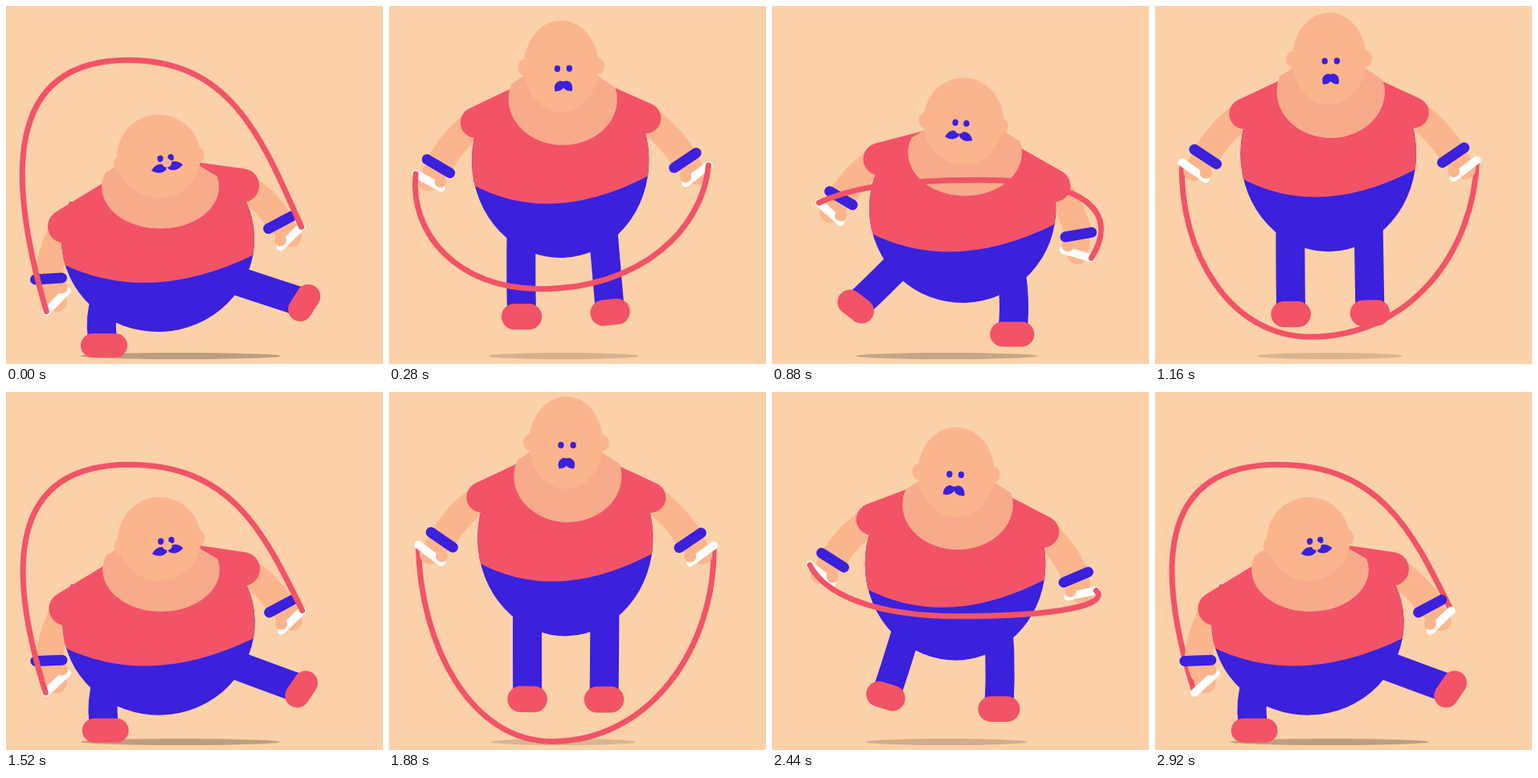
Write an HTML page with a canvas that moves like this. It is 469 by 445 pixels and loops after 2.96 s.

```html
<!DOCTYPE html>
<html lang="en">
<head>
<meta charset="utf-8">
<title>Rope jumper</title>
<style>
html, body { margin: 0; width: 100%; height: 100%; overflow: hidden; background: #fbd1a9; }
canvas { display: block; }
</style>
</head>
<body>
<canvas id="stage" width="469" height="445"></canvas>
<script>
const g = document.getElementById('stage').getContext('2d');
const BG = '#fbd1a9', SKIN = '#fbb58d', NECK = '#f8ab8a', RED = '#f25367', BLUE = '#3b20dc', WHITE = '#fff';
const JUMP = 740, STEP = 40, SIDES = [-1, 1];

// Limb joints measured outwards from the head: in the air, landing on this side, landing on the other side
const LIMB = {
  shoulder: [[105, 68], [117, 87], [104, 36]],
  wrist: [[154.5, 121], [137, 152], [151, 82]],
  hand: [[169.5, 138], [127, 180], [164.5, 100]],
  knee: [[48, 235], [80, 190], [104, 157]],
  foot: [[47, 320], [68, 235], [181, 182]],
  bandTurn: [[.6], [-.06], [.49]],
  gripTurn: [[.64], [-.79], [.77]],
  footTurn: [[0], [0], [1.01]],
  footHalf: [[8.5], [14], [9.5]]
};

const mix = (p, q, k) => p.map((v, i) => v + (q[i] - v) * k);

function ends([x, y], turn, half) {
  const dx = half * Math.cos(turn), dy = half * Math.sin(turn);
  return [[x + dx, y - dy], [x - dx, y + dy]];
}

// Sway goes from -1 (left landing) to 1 (right landing); ground is 1 on landing and 0 in the air
function poseAt(t) {
  const k = -Math.cos(Math.PI * t / JUMP);
  const ground = Math.abs(k) ** 2.3, s = 1 - ground;
  const sway = .35 * k + .65 * k ** 3;
  const head = [219 + 29 * sway, 187 - 125 * s];
  const limbs = SIDES.map(side => {
    const limb = { side };
    for (const part in LIMB) {
      const [air, near, far] = LIMB[part];
      limb[part] = mix(air, side * k > 0 ? near : far, ground);
    }
    limb.grip = ends(limb.hand, limb.gripTurn[0], 18);
    return limb;
  });
  return { sway, ground, s, head, limbs, tilt: .12 * sway };
}

const toStage = (pose, side, [x, y]) => [pose.head[0] + side * x, pose.head[1] + y];

function oval(x, y, rx, ry, color) {
  g.fillStyle = color;
  g.beginPath();
  g.ellipse(x, y, rx, ry, 0, 0, 7);
  g.fill();
}

function stroke(width, color, cap = 'round') {
  g.lineWidth = width;
  g.strokeStyle = color;
  g.lineCap = cap;
  g.lineJoin = 'round';
  g.stroke();
}

function bar(p, q, width, color) {
  g.beginPath();
  g.moveTo(...p);
  g.lineTo(...q);
  stroke(width, color);
}

function bend(p, q, r, width, color) {
  g.beginPath();
  g.moveTo(...p);
  g.quadraticCurveTo(...q, ...r);
  stroke(width, color, 'butt');
}

// Draws in a moved, turned and optionally mirrored frame
function within(x, y, turn, side, paint) {
  g.save();
  g.translate(x, y);
  g.rotate(turn);
  g.scale(side, 1);
  paint();
  g.restore();
}

function drawRope(pose, t) {
  const { sway, ground, s, limbs } = pose;
  const [left, right] = limbs.map(l => toStage(pose, l.side, l.grip[0]));
  const turn = 2 * Math.PI * t / JUMP;
  const swing = Math.cos(turn + .2 * Math.sin(2 * turn));
  const [mx, my] = mix(left, right, .5);
  const top = [mx + 57 * sway - 20 * s, my - 260 * swing];
  const controls = ([x, y], side) => {
    const reach = .6 * Math.abs(x - top[0]) + (side * sway > 0 ? 95 * ground : 0);
    return [[x + 48 * sway, y + .52 * (top[1] - y)], [top[0] + side * reach, top[1]]];
  };
  const [l1, l2] = controls(left, -1), [r1, r2] = controls(right, 1);
  g.beginPath();
  g.moveTo(...left);
  g.bezierCurveTo(...l1, ...l2, ...top);
  g.bezierCurveTo(...r2, ...r1, ...right);
  stroke(7, RED);
}

function drawLeg({ knee, foot, footTurn, footHalf }, s) {
  bend([48, 138 + 15.5 * s], knee, foot, 36, BLUE);
  bar(...ends(foot, footTurn[0], footHalf[0]), 30 + 2.5 * s, RED);
}

function drawArm({ shoulder, wrist, hand, grip, bandTurn }) {
  const [dx, dy] = [wrist[0] - shoulder[0], wrist[1] - shoulder[1]];
  const k = 8 / Math.hypot(dx, dy), elbow = mix(shoulder, wrist, .5);
  bend(shoulder, [elbow[0] + dy * k, elbow[1] - dx * k], wrist, 34, SKIN);
  bar(wrist, mix(wrist, hand, .5), 29, SKIN);
  oval(...hand, 13, 13, SKIN);
  bar(...grip, 10, WHITE);
  oval(...mix(grip[1], wrist, .28), 7.5, 7.5, SKIN);
  bar(...ends(wrist, bandTurn[0], 16.5), 13, BLUE);
}

function drawTorso(pose) {
  const { head: [x, y], s, tilt, limbs } = pose;
  const cx = x - 1, cy = y + 103 + 15.5 * s, rx = 120 - 11 * s, ry = 115 + 7 * s;

  g.save();
  g.fillStyle = BLUE;
  g.beginPath();
  g.ellipse(cx, cy, rx, ry, 0, -.42, Math.PI + .42);
  g.fill();
  g.clip();
  g.fillStyle = RED;
  g.beginPath();
  g.moveTo(cx - rx, cy - ry);
  g.lineTo(cx - rx, cy + 30);
  g.quadraticCurveTo(cx - 12, cy + 83, cx + rx, cy + 19);
  g.lineTo(cx + rx, cy - ry);
  g.fill();
  g.restore();

  const collar = SIDES.map(side => {
    const px = side * 41, py = 33 + 5 * s;
    return [x + px - py * tilt, y + py + px * tilt];
  });
  const [left, right] = limbs.map(l => toStage(pose, l.side, l.shoulder));
  g.fillStyle = RED;
  g.beginPath();
  for (const p of [left, ...collar, right]) g.lineTo(...p);
  g.closePath();
  g.fill();
  stroke(42 - 4 * s, RED);
}

function drawHead({ head: [x, y], s, sway, tilt }) {
  const rx = 52 - 6 * s, ry = 52 + 5.5 * s;
  g.fillStyle = NECK;
  g.beginPath();
  g.ellipse(x + 2, y + .65 * ry + 4, rx + 21, ry, 0, -.26, Math.PI + .35);
  g.lineTo(x, y - 18);
  g.fill();

  within(x, y + 4 * (1 - s), tilt, 1, () => {
    for (const side of SIDES) oval(side * (rx - 3 + 2.5 * s), 0, 8, 10, SKIN);
  });
  oval(x, y, rx, ry, SKIN);

  within(x + 1.5 - 7 * sway, y + 2 + s, tilt, 1, () => {
    for (const side of SIDES) oval(side * (6.6 + s), 0, 3.7, 4.1, BLUE);
  });

  const lip = [x + 1 - 9 * sway, y + 12 + 6 * s], tip = 20 - 3 * s;
  for (const side of SIDES) within(...lip, 1.6 * tilt, side, () => {
    g.rotate(.1 + .9 * s);
    g.fillStyle = BLUE;
    g.beginPath();
    g.moveTo(0, 0);
    g.quadraticCurveTo(9, -10, tip, 0);
    g.quadraticCurveTo(11, 9, 2, 4);
    g.fill();
  });
  oval(lip[0], lip[1] - 4, 6, 5.5, SKIN);
}

function draw(t) {
  const pose = poseAt(t), { head, s, limbs } = pose;
  const ropeInFront = t % JUMP < 385;

  g.fillStyle = BG;
  g.fillRect(0, 0, 469, 445);
  oval(217, 435, 125 - 35 * s, 4, `rgba(0,0,0,${.25 - .11 * s})`);
  if (!ropeInFront) drawRope(pose, t);
  for (const limb of limbs) within(...head, 0, limb.side, () => {
    drawLeg(limb, s);
    drawArm(limb);
  });
  drawTorso(pose);
  drawHead(pose);
  if (ropeInFront) drawRope(pose, t);
}

const start = performance.now();
function frame() {
  const t = Math.floor((performance.now() - start) / STEP) * STEP;
  draw(t % (2 * JUMP));
  requestAnimationFrame(frame);
}
frame();
</script>
</body>
</html>
```
